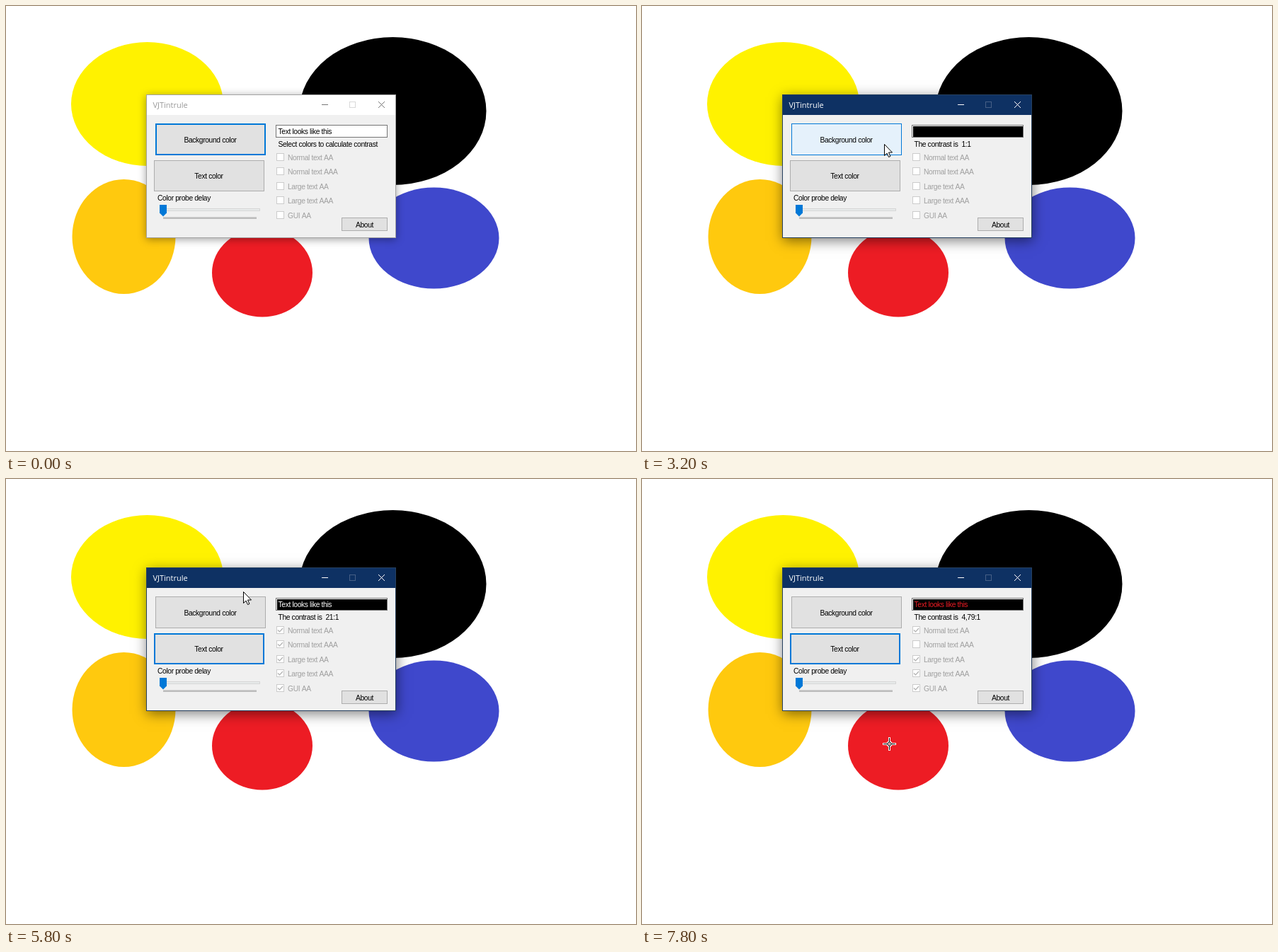
An HTML page with a canvas for the animation above (8000 ms loop, 890 by 629 pixels).

```html
<!DOCTYPE html>
<html lang="en">
<head>
<meta charset="utf-8">
<title>Contrast checker</title>
<style>
  html, body { margin: 0; width: 100%; height: 100%; overflow: hidden; background: #fff; }
  canvas { display: block; }
</style>
</head>
<body>
<canvas id="stage" width="890" height="629"></canvas>
<script>
const ctx = document.getElementById('stage').getContext('2d');
const LOOP = 8000, TICK = 200 / 3;
const UI = '10.3px "Liberation Sans", Arial, sans-serif';
const TITLE = '11px "Open Sans", "Noto Sans", sans-serif';
const BG_BUTTON = { x: 211, y: 166, w: 156, h: 45, label: 'Background color', tx: 288.5 };
const TEXT_BUTTON = { x: 209, y: 218, w: 156, h: 44, label: 'Text color', tx: 286.5 };
const CHECKS = [
  ['Normal text AA', 213], ['Normal text AAA', 233], ['Large text AA', 254],
  ['Large text AAA', 274], ['GUI AA', 295]
];

// Pointer path: tick, x, y
const PATH = [
  [11, 775, 143], [17, 316, 192], [20, 316, 192], [28, 503, 85], [43, 503, 85],
  [48, 342, 195], [50, 326, 235], [51, 326, 235], [52, 328, 237], [57, 328, 237],
  [65, 346, 77], [84, 346, 77], [90, 323, 240], [96, 323, 240], [104, 349, 372],
  [116, 349, 372], [117, 349, 374]
];

function pointerAt(k) {
  if (k < PATH[0][0]) return null;
  for (let i = 1; i < PATH.length; i++) {
    const [k0, x0, y0] = PATH[i - 1], [k1, x1, y1] = PATH[i];
    if (k < k1) {
      const u = (k - k0) / (k1 - k0), e = u * u * (3 - 2 * u);
      return { x: Math.round(x0 + (x1 - x0) * e), y: Math.round(y0 + (y1 - y0) * e) };
    }
  }
  const [, x, y] = PATH[PATH.length - 1];
  return { x, y };
}

function fill(x, y, w, h, color) {
  ctx.fillStyle = color;
  ctx.fillRect(x, y, w, h);
}

function box(x, y, w, h, border, color, line = 1) {
  fill(x, y, w, h, border);
  fill(x + line, y + line, w - 2 * line, h - 2 * line, color);
}

function text(str, x, y, color = '#000', align = 'left', font = UI) {
  ctx.font = font;
  ctx.letterSpacing = font === UI ? '-0.37px' : '0px';
  ctx.textAlign = align;
  ctx.fillStyle = color;
  ctx.fillText(str, x, y);
}

function polyline(points, color, width = 1, close = false) {
  ctx.beginPath();
  points.forEach(([x, y]) => ctx.lineTo(x, y));
  if (close) ctx.closePath();
  ctx.strokeStyle = color;
  ctx.lineWidth = width;
  ctx.stroke();
}

function ellipse(x, y, rx, ry, color) {
  ctx.beginPath();
  ctx.ellipse(x, y, rx, ry, 0, 0, Math.PI * 2);
  ctx.fillStyle = color;
  ctx.fill();
}

function drawBackdrop() {
  fill(0, 0, 890, 629, '#fff');
  ellipse(199.5, 138.5, 107.5, 87.5, '#fff200');
  ellipse(546.5, 148.5, 132, 104.5, '#000');
  ellipse(166.5, 326, 73, 81, '#ffc90e');
  ellipse(362, 377, 71, 62.5, '#ed1c24');
  ellipse(604.5, 328, 92, 71.5, '#3f48cc');
}

function drawFrame(active) {
  ctx.save();
  ctx.shadowColor = active ? 'rgba(0,0,0,.5)' : 'rgba(0,0,0,.38)';
  ctx.shadowBlur = active ? 17 : 11;
  ctx.shadowOffsetX = active ? 1 : 0;
  ctx.shadowOffsetY = active ? 4 : 2;
  fill(198, 125, 353, 203, active ? '#26405f' : '#a3a3a3');
  ctx.restore();
  fill(199, 126, 351, 28, active ? '#0e3163' : '#fff');
  fill(199, 154, 351, 173, '#f0f0f0');

  const icon = active ? '#fff' : '#777';
  text('VJTintrule', 207.5, 143.5, active ? '#fff' : '#999', 'left', TITLE);
  fill(446, 139, 9, 1, icon);
  ctx.strokeStyle = active ? '#465f86' : '#d9d9d9';
  ctx.lineWidth = 1;
  ctx.strokeRect(485.5, 135.5, 8, 8);
  polyline([[526, 135], [535, 144]], icon);
  polyline([[535, 135], [526, 144]], icon);
}

function drawButton(b, state) {
  const [border, color, line] = {
    normal: ['#adadad', '#e1e1e1', 1],
    focus: ['#0078d7', '#e1e1e1', 2],
    hover: ['#0078d7', '#e5f1fb', 1],
    pressed: ['#005499', '#cce4f7', 1]
  }[state];
  box(b.x, b.y, b.w, b.h, border, color, line);
  text(b.label, b.tx, b.y + b.h / 2 + 4, '#000', 'center');
}

function drawSlider() {
  text('Color probe delay', 214, 275);
  box(217, 286, 142, 4, '#d6d6d6', '#e7eaea');
  fill(222, 298, 132, 1, '#d0d0d0');
  fill(222, 299, 132, 2, '#bcbcbc');
  ctx.beginPath();
  [[217, 281], [227, 281], [227, 292.5], [222, 297.5], [217, 292.5]]
    .forEach(([x, y]) => ctx.lineTo(x, y));
  ctx.fillStyle = '#0078d7';
  ctx.fill();
}

function drawResults(k) {
  const edge = k >= 14 && k < 19 ? '#171717' : '#757575';
  box(381, 168, 158, 18, edge, '#fff');
  if (k >= 36) fill(383, 170, 155, 15, '#000');
  const ink = k >= 112 ? '#ed1c24' : k >= 72 ? '#fff' : '#000';
  text('Text looks like this', 384.5, 180.5, ink);

  const ratio = k >= 112 ? '4,79:1' : k >= 72 ? '21:1' : '1:1';
  text(k < 36 ? 'Select colors to calculate contrast' : 'The contrast is\u00a0 ' + ratio, 384.5, 198.5);

  CHECKS.forEach(([label, y], i) => {
    box(382, y - 5, 11, 11, '#cccccc', '#fff');
    if (k >= 73 && !(k >= 112 && i === 1)) {
      polyline([[384, y + .5], [386.5, y + 3], [391, y - 2]], '#b0b0b0', 1.2);
    }
    text(label, 398, y + 4.5, '#a0a0a0');
  });
}

function drawArrow({ x, y }) {
  const shape = [[0, 0], [0, 16], [3.6, 12.6], [6, 18], [8.4, 17], [6, 11.5], [11, 11.5]]
    .map(([dx, dy]) => [x + dx + .5, y + dy + .5]);
  ctx.beginPath();
  shape.forEach(p => ctx.lineTo(...p));
  ctx.fillStyle = '#fff';
  ctx.fill();
  polyline(shape, '#000', 1, true);
}

function drawCross({ x, y }) {
  ctx.save();
  ctx.translate(x + .5, y + .5);
  for (const [color, width, reach] of [['#fff', 3, 9.5], ['#000', 1, 8.5]]) {
    for (let i = 0; i < 4; i++) {
      polyline([[2.5, 0], [reach, 0]], color, width);
      ctx.rotate(Math.PI / 2);
    }
    ctx.beginPath();
    ctx.arc(0, 0, 2.5, 0, Math.PI * 2);
    ctx.stroke();
  }
  ctx.restore();
}

function draw(t) {
  const k = Math.floor((t + 4) / TICK);
  const p = pointerAt(k);
  const probing = (k >= 20 && k < 44) || (k >= 57 && k < 85) || k >= 96;
  const over = b => p && p.x >= b.x && p.x < b.x + b.w && p.y >= b.y && p.y < b.y + b.h;
  const state = (b, pressed, focused) =>
    pressed ? 'pressed' : over(b) ? 'hover' : focused ? 'focus' : 'normal';

  drawBackdrop();
  drawFrame(k >= 19);
  drawButton(BG_BUTTON, state(BG_BUTTON, k === 19, k < 56));
  drawButton(TEXT_BUTTON, state(TEXT_BUTTON, k === 56 || k === 95, k >= 56));
  drawSlider();
  drawResults(k);
  box(474, 299, 65, 19, '#adadad', '#e1e1e1');
  text('About', 506.5, 312.5, '#000', 'center');
  if (p) (probing ? drawCross : drawArrow)(p);
}

const start = performance.now();
function loop() {
  draw((performance.now() - start) % LOOP);
  requestAnimationFrame(loop);
}
loop();
</script>
</body>
</html>
```
